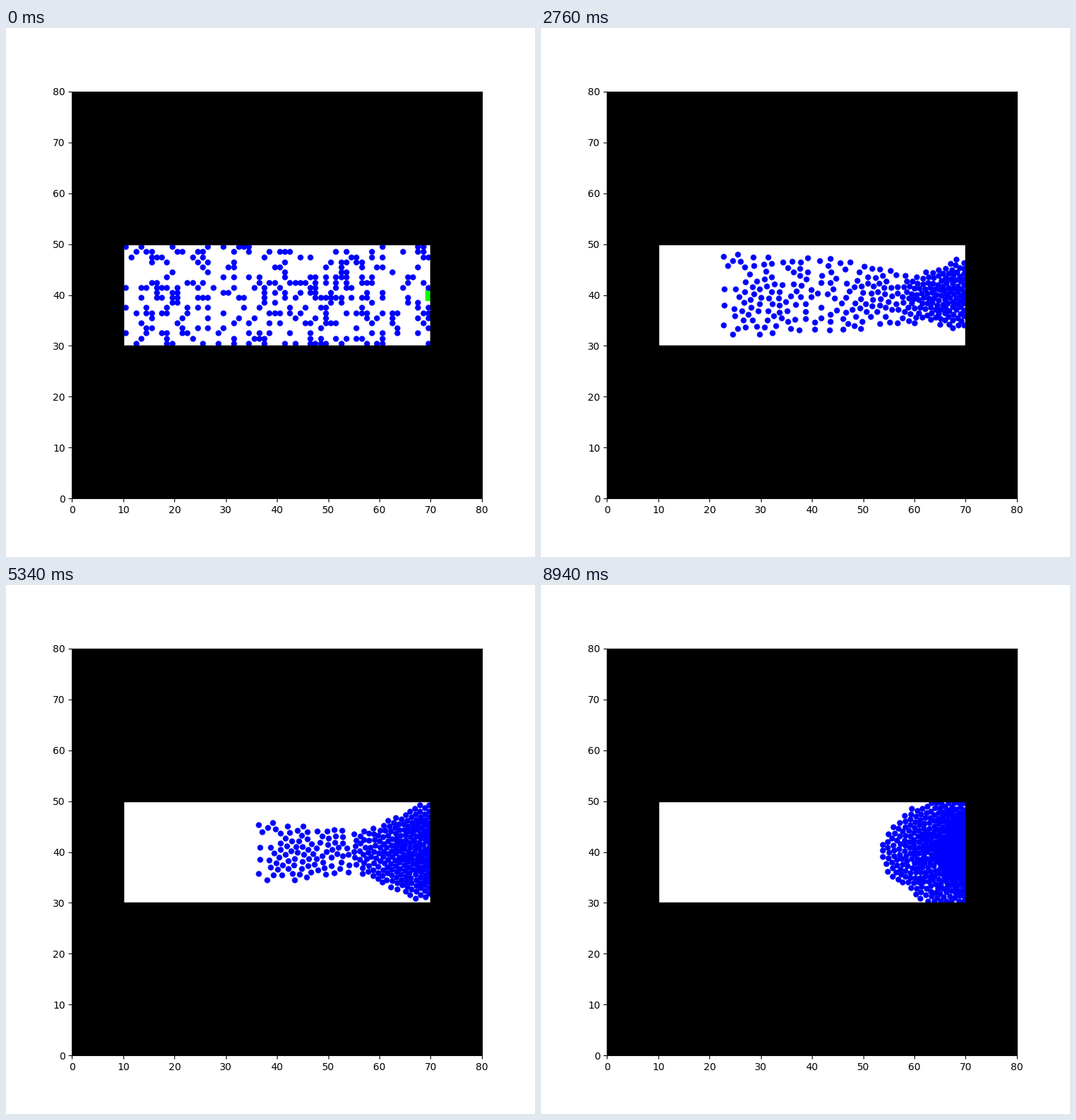
A matplotlib script that plays this animation: 748 by 748 pixels, repeating every 9 s.

```python
import numpy as np
import matplotlib.pyplot as plt
from matplotlib.animation import FuncAnimation
from matplotlib.patches import Rectangle

FRAMES, INTERVAL, SUBSTEPS = 150, 60, 4
STAGE = 748
PEOPLE = 300
LEFT, RIGHT, BOTTOM, TOP, SIZE = 10, 70, 30, 50, 80
EXIT = np.array([70.0, 40.0])
LOW, HIGH = np.array([10.35, 30.35]), np.array([69.7, 49.65])

# Social force model, in cells and frames
SPEED, RELAX = 0.322, 8.0
REACH, FALLOFF, PUSH = 1.14, 0.08, 0.02
TOP_SPEED = 0.42


def starting_crowd():
    cells = [(x, y) for x in range(LEFT, RIGHT) for y in range(BOTTOM, TOP)
             if (x, y) not in ((69, 39), (69, 40))]
    rng = np.random.default_rng(12)
    picks = rng.choice(len(cells), PEOPLE, replace=False)
    return np.array(cells)[picks] + 0.5


def repulsion(pos):
    dx = pos[:, 0, None] - pos[None, :, 0]
    dy = pos[:, 1, None] - pos[None, :, 1]
    dist = np.sqrt(dx * dx + dy * dy) + 1e-6
    force = PUSH * np.exp((REACH - np.maximum(dist, 0.75)) / FALLOFF) / dist
    np.fill_diagonal(force, 0)
    return np.stack([(force * dx).sum(1), (force * dy).sum(1)], axis=1)


def simulate():
    pos = starting_crowd()
    vel = np.zeros_like(pos)
    dt = 1 / SUBSTEPS
    path = [pos.copy()]
    for _ in range(FRAMES - 1):
        for _ in range(SUBSTEPS):
            to_exit = EXIT - pos
            gap = np.linalg.norm(to_exit, axis=1, keepdims=True)
            wish = SPEED * to_exit / np.maximum(gap, 0.5)
            vel += dt * ((wish - vel) / RELAX + repulsion(pos))
            pace = np.linalg.norm(vel, axis=1, keepdims=True)
            vel *= np.minimum(1, TOP_SPEED / np.maximum(pace, 1e-6))
            moved = pos + dt * vel
            pos = np.clip(moved, LOW, HIGH)
            vel[pos != moved] = 0
        path.append(pos.copy())
    return path


def wall(x, y, width, height):
    ax.add_patch(Rectangle((x, y), width, height, color="black", zorder=2.4))


path = simulate()

fig, ax = plt.subplots(figsize=(STAGE / 100, STAGE / 100), dpi=100)
fig.subplots_adjust(left=93.4 / STAGE, right=672.9 / STAGE,
                    bottom=82.6 / STAGE, top=658.4 / STAGE)
ax.set_xlim(0, SIZE)
ax.set_ylim(0, SIZE)

# The walls lie over the dots and cut them off at the edge of the room
wall(0, 0, LEFT, SIZE)
wall(RIGHT, 0, SIZE - RIGHT, SIZE)
wall(0, 0, SIZE, BOTTOM)
wall(0, TOP, SIZE, SIZE - TOP)
ax.add_patch(Rectangle((69, 39), 1, 2, color="lime"))
dots, = ax.plot([], [], "o", color="blue", ms=5, mew=1, zorder=2)


def draw(frame):
    dots.set_data(path[frame][:, 0], path[frame][:, 1])
    return dots,


anim = FuncAnimation(fig, draw, frames=FRAMES, interval=INTERVAL,
                     init_func=lambda: draw(0), repeat=True, repeat_delay=0)
plt.show()
```
